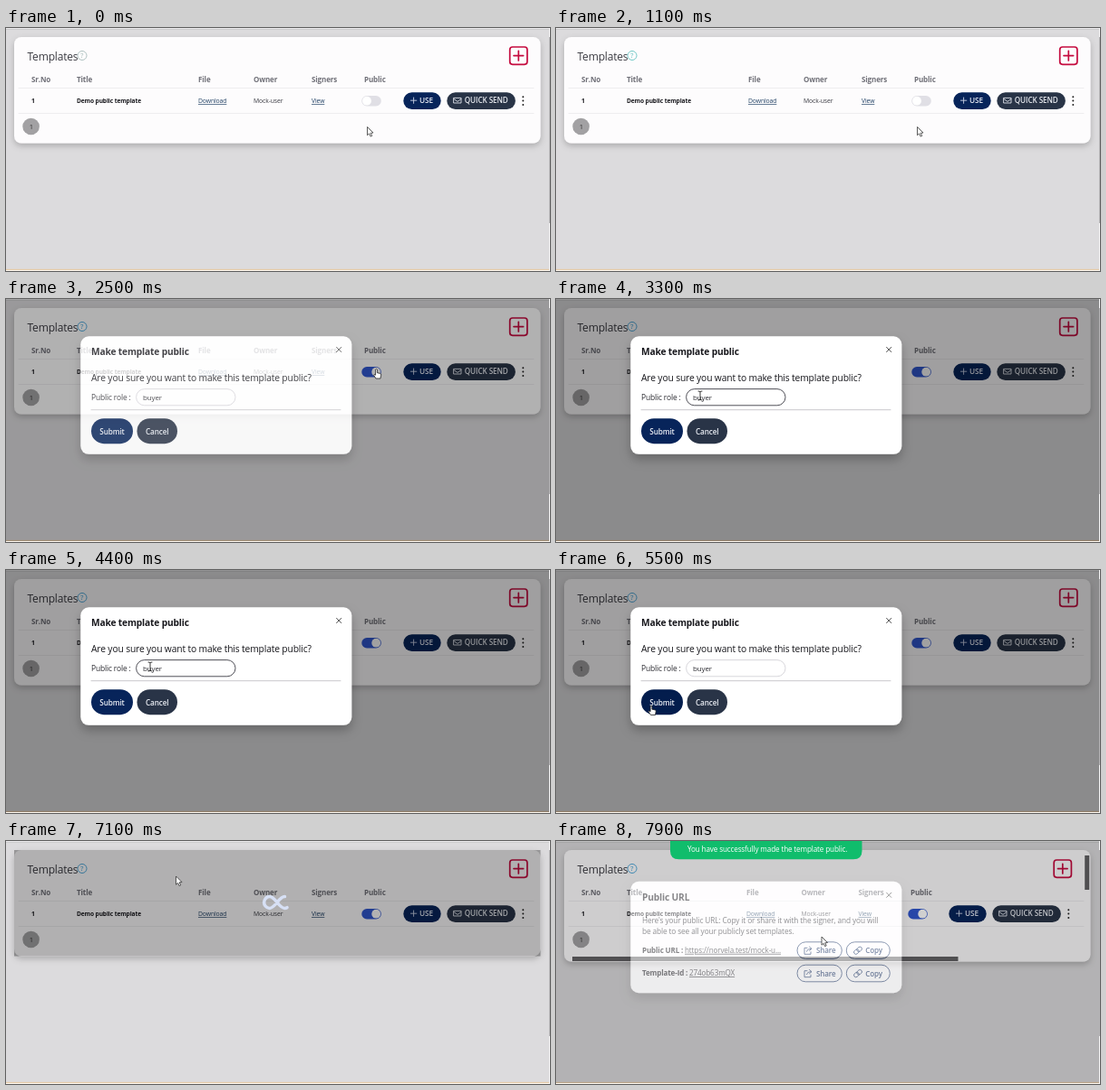
An HTML page that plays this animation: 600 by 269 pixels, repeating every 8 s.

```html
<!DOCTYPE html>
<html lang="en">
<head>
<meta charset="utf-8">
<title>Make template public</title>
<style>
  html, body { margin: 0; width: 100%; height: 100%; overflow: hidden; background: #dcdbdd; }
  svg { display: block; width: 100vw; height: 100vh; }
  text { font-family: "Open Sans", "Noto Sans", sans-serif; letter-spacing: -.015em; }
  .b { font-weight: 700; }
  .s { font-weight: 600; }
  .u { text-decoration: underline; }
  .line { fill: none; stroke-linecap: round; stroke-linejoin: round; }
</style>
</head>
<body>
<svg id="stage" viewBox="0 0 600 269" preserveAspectRatio="none"></svg>
<script>
const LOOP = 8000;
const CLICK_TOGGLE = 2380, CLICK_SUBMIT = 5700, DONE = 7800;
const NAVY = '#07245a', SLATE = '#293447', INK = '#17171c', RED = '#c50b3f';

const text = (x, y, size, str, fill = INK, cls = '') =>
  `<text x="${x}" y="${y}" font-size="${size}" fill="${fill}" class="${cls}">${str}</text>`;
const box = (x, y, w, h, r, fill, extra = '') =>
  `<rect x="${x}" y="${y}" width="${w}" height="${h}" rx="${r}" fill="${fill}" ${extra}/>`;
const line = (d, color, width = 1) =>
  `<path class="line" d="${d}" stroke="${color}" stroke-width="${width}"/>`;
// Part that moves left by dx once the card gets scrollbars
const shifted = (dx, body) => `<g data-dx="${dx}">${body}</g>`;

const heading = (x, str) => text(x, 60, 8, str, '#707078', 'b');

const card = `
  <rect id="card" x="9" y="10" width="580.5" height="117.5" rx="8" fill="#fdfcfd" filter="url(#soft)"/>
  ${text(23.5, 36, 12, 'Templates', '#3b3b42')}
  <g id="help">
    <circle cx="84" cy="30.5" r="5" fill="none" stroke="currentColor" stroke-width=".9"/>
    ${text(82.1, 33.4, 8, '?', 'currentColor')}
  </g>
  ${shifted(-6.5, box(555.7, 21, 19.2, 19.3, 3, 'none', `stroke="${RED}" stroke-width="1.7"`)
    + line('M560 30.6H570.6M565.3 25.3V35.9', RED, 1.7))}
  ${heading(28, 'Sr.No')}${heading(78, 'Title')}
  ${shifted(-2, heading(212, 'File') + text(212, 83, 6.8, 'Download', '#1f3f63', 'u'))}
  ${shifted(-2.5, heading(273, 'Owner') + text(273, 83, 6.8, 'Mock-user', '#3c3c44'))}
  ${shifted(-3.5, heading(337, 'Signers') + text(337, 83, 6.8, 'View', '#1f3f63', 'u'))}
  ${shifted(-4, heading(395, 'Public')
    + box(392.3, 75, 21.5, 11.4, 5.7, '#e0dfe5', 'id="track"')
    + '<circle id="knob" cy="80.7" r="4.9" fill="#fff"/>')}
  ${line('M14 66.5H582M14 94.5H582', '#ebeaed', .8)}
  ${text(28, 83, 6.8, '1', INK, 'b')}
  ${text(78, 83, 6.6, 'Demo public template', INK, 'b')}
  ${shifted(-5, box(438.3, 71.3, 41.4, 18.8, 9.4, NAVY)
    + line('M446.4 80.2H452.8M449.6 77V83.4', '#c9d2e6', .9)
    + text(456, 83.3, 8.3, 'USE', '#e8ecf5', 's')
    + box(486.3, 71.3, 75.6, 18.8, 9.4, SLATE)
    + line('M494 77.4H502V83H494ZM494 78.6L498 81.4L502 78.6', '#dfe3ea', .9)
    + text(505.8, 83.3, 8.2, 'QUICK SEND', '#e8ebf0', 's')
    + [76.3, 80.6, 84.9].map(y => `<circle cx="570.3" cy="${y}" r="1" fill="#222"/>`).join(''))}
  <circle cx="27.6" cy="109" r="9.3" fill="#a2a1a3"/>
  ${text(25.7, 111.8, 7.6, '1', '#333')}
  <g id="bars">
    ${box(18, 128, 425.5, 5, 0, '#626164')}
    ${box(583.2, 16, 5, 38, 0, '#626164')}
  </g>`;

const loader = `
  ${box(9, 10, 580.5, 117.5, 0, '#000', 'opacity=".3"')}
  <path id="spin" class="line" transform="translate(283 52) scale(.32)" stroke="#d7e0f5" stroke-width="11"
    pathLength="100" stroke-dasharray="80 20"
    d="M24 30C11 30 5 43 5 50S11 70 24 70C44 70 56 30 76 30C89 30 95 43 95 50S89 70 76 70C56 70 44 30 24 30Z"/>`;

const shade = box(0, 0, 599, 268, 0, '#000', 'opacity=".37"');
const closeMark = y => line(`M364.6 ${y - 2.6}L369.8 ${y + 2.6}M369.8 ${y - 2.6}L364.6 ${y + 2.6}`, '#333', .9);

const askDialog = `${shade}
  ${box(82.3, 41.3, 299, 130.5, 9, '#fff', 'filter="url(#deep)"')}
  ${text(94, 62, 10.2, 'Make template public', INK, 'b')}${closeMark(56)}
  ${text(94, 91, 10.3, 'Are you sure you want to make this template public?')}
  ${text(94, 111.8, 8.4, 'Public role :', '#2a2a30')}
  ${box(143.6, 99.6, 109.4, 18.2, 9.1, '#fff', 'id="field" stroke-width=".9"')}
  ${text(151, 111.8, 8, 'buyer', '#2a2a30')}
  ${line('M94 122.7H369', '#c9c8cc', 1)}
  ${box(94, 132.2, 46, 28, 14, NAVY, 'id="submit"')}
  ${text(103.3, 149.6, 8.2, 'Submit', '#eef1f7', 's')}
  ${box(144.5, 132.2, 44.5, 28, 14, SLATE)}
  ${text(154, 149.6, 8.2, 'Cancel', '#eef1f7', 's')}`;

const pill = (x, y, w, label) =>
  box(x, y, w, 18.6, 9.3, 'none', `stroke="${NAVY}" stroke-width=".9"`)
  + text(x + 21, y + 12.4, 8, label, NAVY, 's');
const shareRow = (y, label, linkX, link) => `
  ${text(95, y + 12, 8, label, INK, 'b')}
  ${text(linkX, y + 12, 8.1, link, '#2a2a30', 'u')}
  ${pill(266, y, 49.3, 'Share')}
  ${line(`M277 ${y + 6.5}H274V${y + 13.5}H281V${y + 11}M276.5 ${y + 10.5}Q277 ${y + 7.5} 281.5 ${y + 7.5}`
    + `M279.5 ${y + 5.3}L282 ${y + 7.5}L279.5 ${y + 9.5}`, NAVY, .9)}
  ${pill(320.3, y, 48, 'Copy')}
  <g transform="rotate(-40 333 ${y + 9.3})">
    ${box(327.8, y + 7.2, 6, 4.4, 2.2, 'none', `stroke="${NAVY}" stroke-width=".9"`)}
    ${box(332, y + 7.2, 6, 4.4, 2.2, 'none', `stroke="${NAVY}" stroke-width=".9"`)}
  </g>`;

const linkDialog = `${shade}
  ${box(82.3, 44.8, 299, 123.4, 9, '#fff', 'filter="url(#deep)"')}
  ${text(95, 66, 10.2, 'Public URL', INK, 'b')}${closeMark(59.8)}
  ${text(95, 91, 8.3, "Here's your public URL: Copy it or share it with the signer, and you will", '#2a2a30')}
  ${text(95, 102.8, 8.3, 'be able to see all your publicly set templates.', '#2a2a30')}
  ${shareRow(111.8, 'Public URL :', 142, 'https://norvela.test/mock-u...')}
  ${shareRow(137.2, 'Template-Id :', 147, '274ob63mQX')}`;

const toast = `
  <path d="M126 0H337.5V11Q337.5 20.3 328 20.3H135.5Q126 20.3 126 11Z" fill="#10bd6c"/>
  ${text(145, 12.2, 8.1, 'You have successfully made the template public.', '#fff')}`;

const pointers = `
  <g id="arrow"><path d="M0 0V9.2L2.1 7.4L3.6 10.6L5.2 9.9L3.7 6.8L6.5 6.5Z" fill="#fff" stroke="#333" stroke-width=".8"/></g>
  <g id="hand"><path d="M-.9 .6Q0 -.5 .9 .6V4.2L4.3 4.9Q5.4 5.2 5.2 6.6L4.5 10.5H-.6L-3 6.6Q-2.9 5.3 -.9 6.7Z" fill="#fff" stroke="#222" stroke-width=".8"/></g>
  <g id="beam">${line('M-2 -5Q0 -5 0 -4Q0 -5 2 -5M0 -4V4M-2 5Q0 5 0 4Q0 5 2 5', '#222', .9)}</g>`;

const stage = document.getElementById('stage');
stage.innerHTML = `
  <defs>
    <filter id="soft" x="-5%" y="-20%" width="110%" height="150%">
      <feDropShadow dx="0" dy="3" stdDeviation="3.5" flood-opacity=".22"/>
    </filter>
    <filter id="deep" x="-10%" y="-20%" width="120%" height="150%">
      <feDropShadow dx="0" dy="6" stdDeviation="6" flood-opacity=".25"/>
    </filter>
  </defs>
  ${box(0, 0, 600, 269, 0, '#dcdbdd')}
  ${box(0, 0, 600, 1, 0, '#e9e8ea')}${box(0, 1, 600, .8, 0, '#c9c8ca')}
  ${card}
  ${box(0, 266.8, 600, 1.2, 0, '#e6cba8')}
  <g id="loader">${loader}</g>
  <g id="ask">${askDialog}</g>
  <g id="link">${linkDialog}</g>
  <g id="toast">${toast}</g>
  ${box(0, 268, 600, 1, 0, '#fbf6ef')}
  ${box(599, 0, 1, 269, 0, '#f6f5f6')}${box(599, 10, 1, 206, 0, '#b4b3b5')}
  ${pointers}`;

const el = {};
stage.querySelectorAll('[id]').forEach(node => el[node.id] = node);
const movers = [...stage.querySelectorAll('[data-dx]')];

const clamp = v => Math.max(0, Math.min(1, v));
const ease = v => v * v * (3 - 2 * v);
const show = (node, opacity) => {
  node.style.display = opacity > 0 ? '' : 'none';
  node.style.opacity = opacity;
};

// Pointer stops: time, x, y
const stops = [
  [0, 398.5, 109.5], [1200, 398.5, 109.5], [2100, 408.5, 77.5], [2600, 408.5, 77.5],
  [3250, 159, 107], [4600, 159, 107], [5350, 105, 150], [6000, 105, 150],
  [7000, 187.5, 39], [7250, 187.5, 39], [7850, 293, 106]
];

function pointerAt(t) {
  const i = stops.findIndex(s => s[0] > t);
  if (i < 0) return stops[stops.length - 1].slice(1);
  const [t0, x0, y0] = stops[i - 1], [t1, x1, y1] = stops[i];
  const k = ease((t - t0) / (t1 - t0));
  return [x0 + (x1 - x0) * k, y0 + (y1 - y0) * k];
}

function render(t) {
  const asking = t >= CLICK_TOGGLE && t < CLICK_SUBMIT;
  const done = t >= DONE;
  const on = ease(clamp((t - CLICK_TOGGLE) / 90));

  el.help.style.color = t < 1000 ? '#a6bcba' : t < CLICK_TOGGLE ? '#62c3c0' : '#3a9fd6';
  el.knob.setAttribute('cx', 398 + 10.2 * on);
  el.track.setAttribute('fill', on > .5 ? '#3157cf' : '#e0dfe5');

  show(el.ask, asking ? clamp((t - CLICK_TOGGLE) / 150) : 0);
  show(el.loader, t >= CLICK_SUBMIT && !done ? 1 : 0);
  show(el.link, done ? clamp((t - DONE) / 200) : 0);
  show(el.toast, done ? 1 : 0);
  show(el.bars, done ? 1 : 0);
  el.spin.setAttribute('stroke-dashoffset', (t - CLICK_SUBMIT) % 2000 / -20);
  el.card.setAttribute('height', done ? 123.5 : 117.5);
  movers.forEach(m => m.setAttribute('transform', `translate(${done ? m.dataset.dx : 0} 0)`));

  const [x, y] = pointerAt(t);
  const inField = asking && x > 144 && x < 253 && y > 99 && y < 118;
  const onSubmit = asking && x < 140 && y > 132 && y < 160;
  const onToggle = asking && x > 392 && x < 414 && y < 87;
  const kind = inField ? 'beam' : onSubmit || onToggle ? 'hand' : 'arrow';
  for (const name of ['arrow', 'hand', 'beam']) show(el[name], name === kind ? 1 : 0);
  el[kind].setAttribute('transform', `translate(${x} ${y})`);
  el.field.setAttribute('stroke', inField ? '#3c3c44' : '#d3d2d7');
  el.submit.setAttribute('fill', onSubmit ? '#031d4d' : NAVY);
}

const start = performance.now();
function tick() {
  render((performance.now() - start) % LOOP);
  requestAnimationFrame(tick);
}
tick();
</script>
</body>
</html>
```
